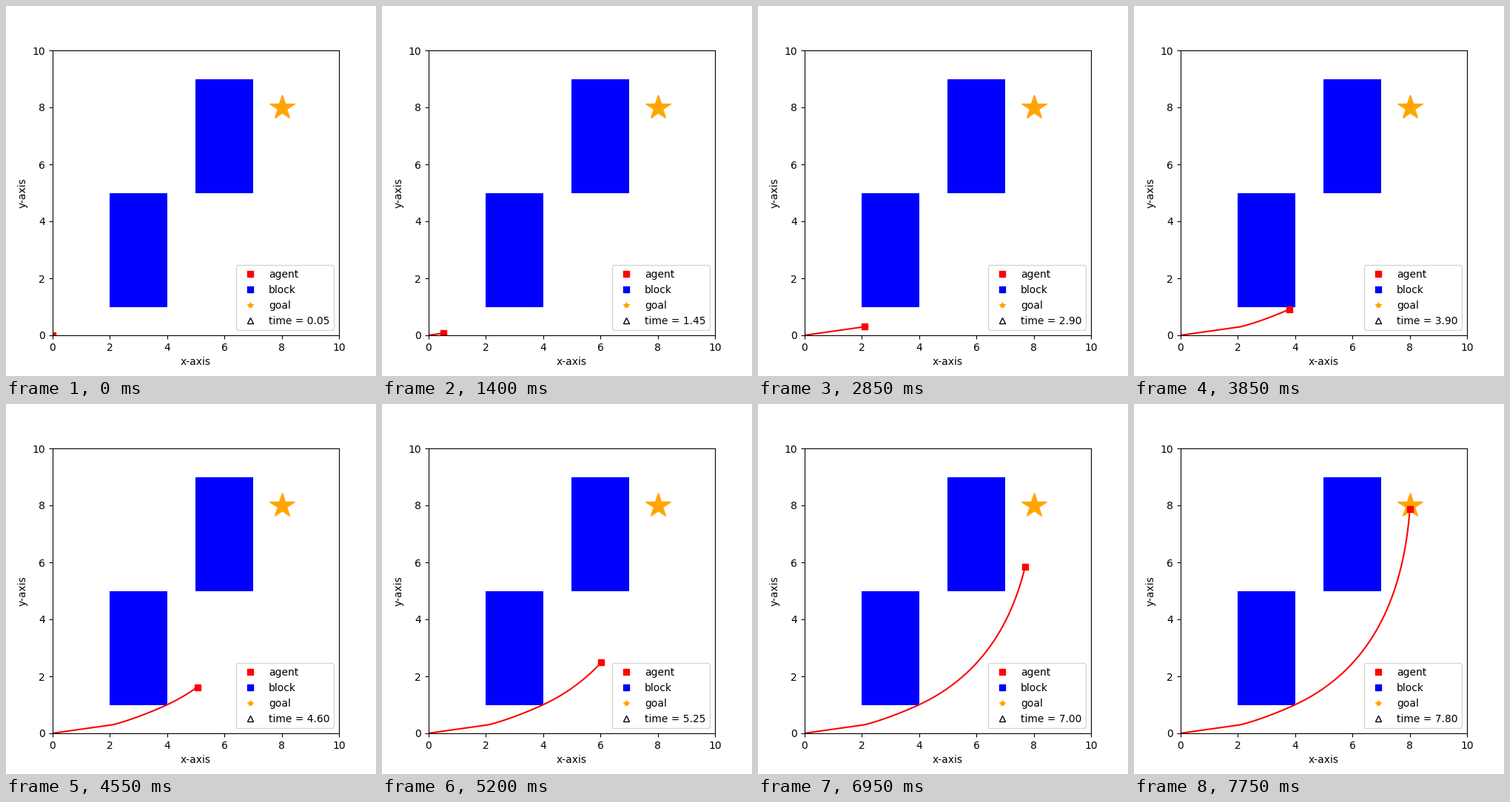
Write a matplotlib script that moves like this. It is 500 px wide and 500 px high and loops after 7800 ms.

```python
import numpy as np
import matplotlib.pyplot as plt
from matplotlib.animation import FuncAnimation
from matplotlib.patches import Rectangle

STEP = 0.05
COUNT = 156
TURN_X, TURN_Y = 3.9, 2.9  # moments when the steering changes


def position(t):
    """Agent position under piecewise constant acceleration."""
    sx, sy = t - TURN_X, t - TURN_Y
    x = np.where(sx < 0, 0.25 * t**2, 3.8 + 1.96 * sx - 0.226 * sx**2)
    y = np.where(sy < 0, 0.0357 * t**2, 0.3 + 0.37 * sy + 0.24 * sy**2)
    return x, y


times = STEP * np.arange(1, COUNT + 1)
xs, ys = position(times)

fig, ax = plt.subplots(figsize=(5, 5), dpi=100)
ax.set(xlim=(0, 10), ylim=(0, 10), xlabel="x-axis", ylabel="y-axis")

for corner in [(2, 1), (5, 5)]:
    ax.add_patch(Rectangle(corner, 2, 4, facecolor="blue", linewidth=0))

ax.plot(8, 8, "*", color="orange", markersize=25)
trail, = ax.plot([], [], color="red")
agent, = ax.plot([], [], "s", color="red")

handles = [
    ax.plot([], [], "s", color="red", label="agent")[0],
    ax.plot([], [], "s", color="blue", label="block")[0],
    ax.plot([], [], "*", color="orange", label="goal")[0],
    ax.plot([], [], "^", mfc="white", mec="black", label="time = 0.05")[0],
]
legend = ax.legend(handles=handles, loc="lower right")
clock = legend.get_texts()[-1]


def update(i):
    trail.set_data(xs[:i + 1], ys[:i + 1])
    agent.set_data([xs[i]], [ys[i]])
    clock.set_text(f"time = {times[i]:.2f}")
    return trail, agent, clock


anim = FuncAnimation(fig, update, frames=COUNT, interval=50,
                     repeat=True, repeat_delay=0, blit=False)
plt.show()
```
